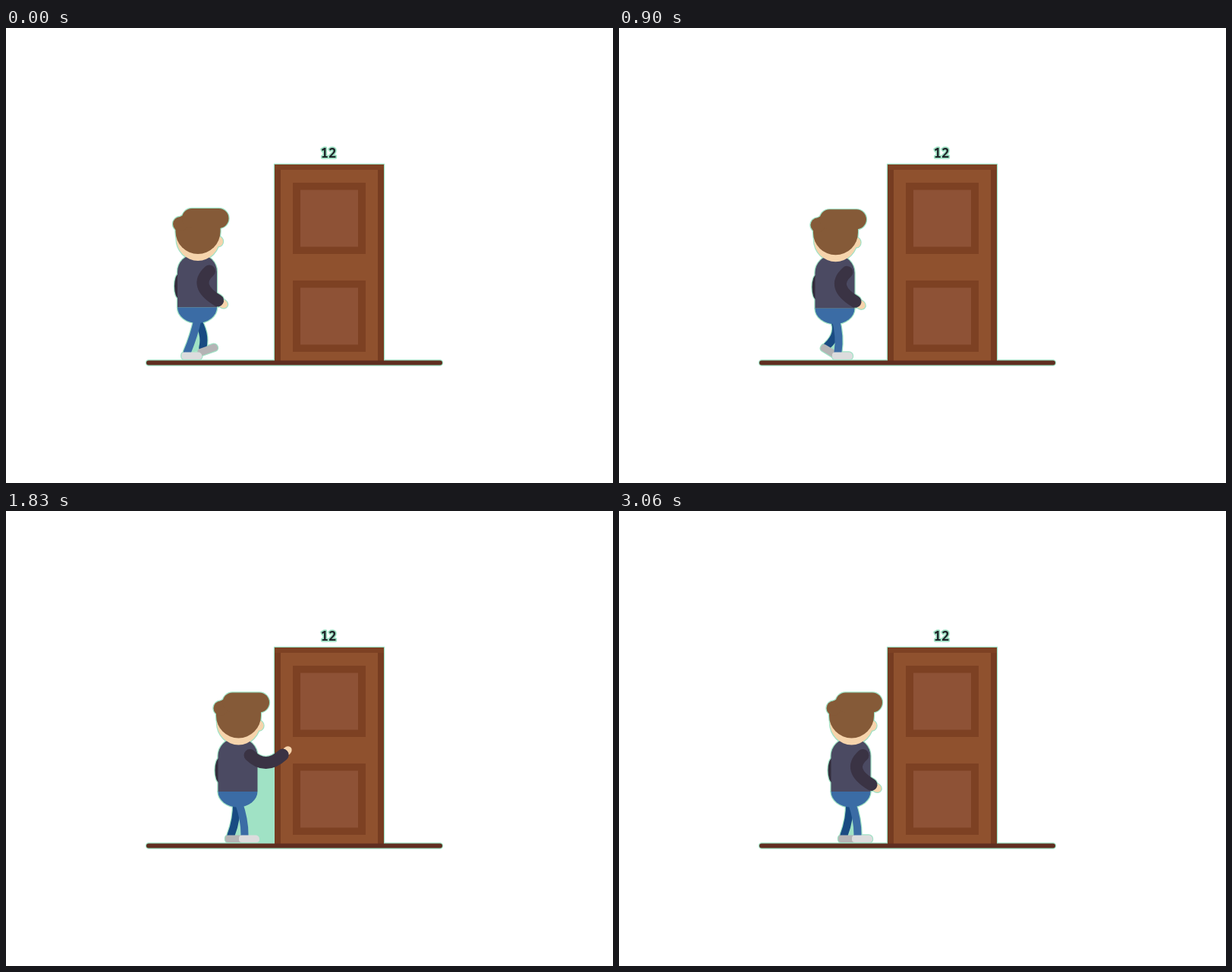
Animation, 800 px wide and 600 px high, one loop 3.09 s. Source, as an HTML page with a canvas:

```html
<!DOCTYPE html>
<html lang="en">
<head>
<meta charset="utf-8">
<title>Knock at door 12</title>
<style>
  html, body { margin: 0; width: 100%; height: 100%; overflow: hidden; background: #fff; }
  canvas { display: block; }
</style>
</head>
<body>
<canvas id="stage" width="800" height="600"></canvas>
<script>
const ctx = document.getElementById('stage').getContext('2d');
const { PI, sin, cos, min, max, hypot } = Math;
const RAD = PI / 180;

const LOOP = 3090, TICK = 30;
const START = 252, HOME = 305.5, WALK = 1560, STRIDE = 1100;
const KNOCK_AT = 1830, KNOCK = 280, KNOCKS = 3;
const GROUND = 429.5, HIP = 384;

const MINT = '#a0e2c5', SKIN = '#f6d4ac', HAIR = '#855a38', SLEEVE = '#3a3344',
      VEST = '#4b4a62', JEANS = '#3b6ca5', JEANS_FAR = '#194b82',
      FRAME = '#7d4123', WOOD = '#8f512e', PANEL = '#8e5236';

const mix = (a, b, p) => a + (b - a) * p;
const ramp = (t, from, to) => min(1, max(0, (t - from) / (to - from)));
const ease = (t, from, to) => (1 - cos(PI * ramp(t, from, to))) / 2;

let halo = false; // true while the mint edge is laid down

function shape(color, draw) {
  ctx.beginPath();
  draw();
  ctx.fillStyle = halo ? MINT : color;
  ctx.fill();
  if (halo) {
    ctx.strokeStyle = MINT;
    ctx.lineWidth = 2.4;
    ctx.stroke();
  }
}
const box = (color, x, y, w, h, r = 0) => shape(color, () => ctx.roundRect(x, y, w, h, r));
const oval = (color, x, y, rx, ry = rx, turn = 0, end = 2 * PI) =>
  shape(color, () => ctx.ellipse(x, y, rx, ry, turn, 0, end));

function limb(color, width, from, bend, to) {
  ctx.beginPath();
  ctx.moveTo(from.x, from.y);
  ctx.quadraticCurveTo(bend.x, bend.y, to.x, to.y);
  ctx.strokeStyle = halo ? MINT : color;
  ctx.lineWidth = width + (halo ? 2.4 : 0);
  ctx.stroke();
}

// The foot slides back on the ground, then swings forward: heel up first, toe up last
function footAt(phase, x, rest, settle) {
  const swing = PI * ramp(phase % 1, 0.15, 0.6), moving = 1 - settle;
  return {
    x: x + mix(-3 + 16 * cos(2 * PI * (phase - 0.64)), rest, settle),
    y: GROUND - 9 * sin(swing) * moving,
    turn: (28 * sin(2 * swing) + 12 * sin(swing)) * RAD * moving
  };
}

// One number lifts the whole arm: 0 hangs down, 1 hits the door
function armAt(raise) {
  const shoulder = { x: 321.5, y: 322 };
  const go = (p, angle, length) =>
    ({ x: p.x + length * cos(angle * RAD), y: p.y + length * sin(angle * RAD) });
  const fore = 31 - 100 * raise;
  const elbow = go(shoulder, 138 - 127 * raise, 29);
  const wrist = go(elbow, fore, 38 - 10 * raise);
  return { shoulder, elbow, wrist, hand: go(wrist, fore, 8), turn: fore * RAD };
}

function poseAt(t) {
  const phase = t / STRIDE, settle = ease(t, 1440, 1700);
  const x = mix(START, HOME, 0.7 * ease(t, 0, WALK) + 0.3 * ramp(t, 0, WALK));
  const beat = ramp(t, KNOCK_AT, KNOCK_AT + KNOCK * KNOCKS) * KNOCKS;
  const hit = sin(PI * beat) ** 2;
  const lift = ease(t, 1100, 1900) - ease(t, 2600, 2950);
  return {
    x, hit,
    bob: -1.5 * (1 + sin(2 * PI * phase)) * (1 - settle),
    near: footAt(phase, x, 9, settle),
    far: footAt(phase + 0.5, x, -9, settle),
    arm: armAt(lift * (0.75 + 0.25 * hit))
  };
}

function leg(color, shoe, hip, foot) {
  const bend = 2 + 1.2 * max(0, 48 - hypot(foot.x - hip.x, foot.y - hip.y));
  const knee = { x: (hip.x + foot.x) / 2 + bend, y: (hip.y + foot.y) / 2 };
  limb(color, 10, hip, knee, { x: foot.x, y: foot.y - 2 });
  ctx.save();
  ctx.translate(foot.x, foot.y);
  ctx.rotate(foot.turn);
  box(shoe, -7.5, -2, 27, 9.5, [4, 5, 4, 4]);
  ctx.restore();
}

// Background closed in by the legs, or by arm, door and floor, is mint
function pockets({ x, bob, near, far, arm }) {
  const { shoulder, elbow, wrist, hand } = arm, dx = x - HOME;
  ctx.fillStyle = MINT;
  ctx.beginPath();
  ctx.moveTo(x, HIP);
  ctx.lineTo(near.x, near.y);
  ctx.lineTo(far.x, far.y);
  ctx.fill();
  if (hand.x + dx < 349) return;
  ctx.beginPath();
  ctx.moveTo(308, 438);
  ctx.lineTo(shoulder.x + dx, shoulder.y + bob);
  ctx.quadraticCurveTo(elbow.x + dx, elbow.y + bob, wrist.x + dx, wrist.y + bob);
  ctx.lineTo(355, 438);
  ctx.fill();
}

function man({ x, bob, hit, near, far, arm }) {
  leg(JEANS_FAR, '#b4b4b5', { x: x - 1.5, y: HIP + bob }, far);
  leg(JEANS, '#dcdcdd', { x: x + 1, y: HIP + bob }, near);

  ctx.save();
  ctx.translate(x - HOME, bob);
  oval('#332d3d', 281, 342, 5.5, 16);
  box(VEST, 279.5, 300, 52, 70, [23, 23, 0, 0]);
  oval(JEANS, 305.5, 370, 26, 20.5, 0, PI);

  ctx.save();
  ctx.translate(hit * 1.5, -hit);
  oval(SKIN, 306.5, 279, 28.5, 29.5);
  oval(SKIN, 334, 283, 5.5, 6.5);
  box(HAIR, 277, 248, 59, 51.5, [14, 8, 29.5, 29.5]);
  oval(HAIR, 283, 260, 9.5);
  box(HAIR, 285.5, 239.5, 61.5, 26, 13);
  ctx.restore();

  oval(SKIN, arm.hand.x, arm.hand.y, 6.5, 5.4, arm.turn);
  limb(SLEEVE, 16, arm.shoulder, arm.elbow, arm.wrist);
  ctx.restore();
}

function floor() {
  box('#5f2e20', 185, 438.5, 390, 6, 3);
}

function door() {
  box(FRAME, 354, 180, 144, 259);
  if (halo) return;
  for (const x of [354, 490]) box('#763c21', x, 187, 8, 252);
  box(WOOD, 362, 187, 128, 252);
  for (const y of [204, 333]) {
    box(FRAME, 378, y, 96, 94);
    box(PANEL, 388, y + 9.5, 76, 75);
  }
}

function number() {
  ctx.font = '800 17px "Noto Sans Mono", monospace';
  ctx.textAlign = 'center';
  ctx.strokeStyle = MINT;
  ctx.lineWidth = 3.4;
  ctx.strokeText('12', 425, 171);
  ctx.fillStyle = '#20262a';
  ctx.fillText('12', 425, 171);
}

function frame(now) {
  const pose = poseAt(Math.floor(now % LOOP / TICK) * TICK);
  ctx.fillStyle = '#fff';
  ctx.fillRect(0, 0, 800, 600);
  ctx.lineCap = ctx.lineJoin = 'round';

  halo = true;
  floor();
  door();
  man(pose);
  pockets(pose);
  halo = false;
  door();
  floor();
  number();
  man(pose);
  requestAnimationFrame(frame);
}
requestAnimationFrame(frame);
</script>
</body>
</html>
```
